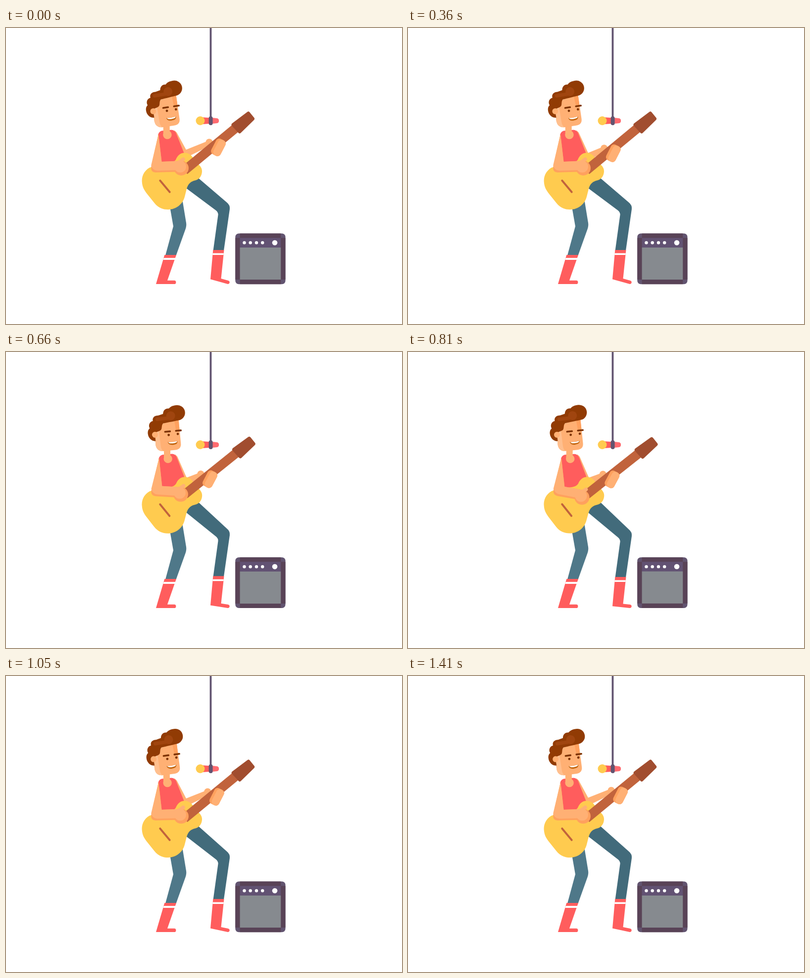
An HTML page with a canvas that plays this animation: 800 by 600 pixels, repeating every 1.44 s.

```html
<!DOCTYPE html>
<html lang="en">
<head>
<meta charset="utf-8">
<title>Guitar player</title>
<style>
  html, body { margin: 0; height: 100%; overflow: hidden; background: #fff; }
  canvas { display: block; }
</style>
</head>
<body>
<canvas id="stage" width="800" height="600"></canvas>
<script>
const ctx = document.getElementById('stage').getContext('2d');
const LOOP = 1440, BEAT = 360;
const SKIN = '#ffb074', SHADE = '#ffa15e', GLOW = '#ffbf8e', RED = '#ff5d5d', YELLOW = '#ffcb4f',
  WOOD = '#c1633c', DARK_WOOD = '#a14d2f', HAIR = '#913b04', PURPLE = '#625470', FRAME = '#594357',
  JEANS = '#426b7b', LIGHT_JEANS = '#4f7889';

const lerp = (a, b, k) => a + (b - a) * k;
const ease = (from, to, t) => {
  const x = Math.min(1, Math.max(0, (t - from) / (to - from)));
  return x * x * (3 - 2 * x);
};
// Rises from 0 to 1, holds, then falls back.
const swing = (t, a, b, c, d) => ease(a, b, t) - ease(c, d, t);

function shape(color, d) {
  ctx.fillStyle = color;
  ctx.fill(new Path2D(d));
}
function line(color, width, d) {
  ctx.strokeStyle = color;
  ctx.lineWidth = width;
  ctx.lineCap = ctx.lineJoin = 'round';
  ctx.stroke(new Path2D(d));
}
function oval(color, x, y, rx, ry = rx) {
  ctx.fillStyle = color;
  ctx.beginPath();
  ctx.ellipse(x, y, rx, ry, 0, 0, 7);
  ctx.fill();
}
function box(color, x, y, w, h, r = 0) {
  ctx.fillStyle = color;
  ctx.beginPath();
  ctx.roundRect(x, y, w, h, r);
  ctx.fill();
}
function turned(degrees, x, y, draw) {
  ctx.save();
  ctx.translate(x, y);
  ctx.rotate(degrees * Math.PI / 180);
  ctx.translate(-x, -y);
  draw();
  ctx.restore();
}

function microphone() {
  shape(RED, 'M396 181L426 183Q430 184 430 188Q430 192 426 193L396 195Z');
  shape('#ff6b70', 'M414 182.2L426 183Q430 184 430 188Q430 192 426 193L414 193.8Z');
  oval(YELLOW, 392.5, 188, 9);
  box(PURPLE, 411.6, 0, 3.8, 185);
  box(PURPLE, 409.6, 179, 8, 18, 4);
}

function amplifier(lift) {
  ctx.save();
  ctx.translate(0, -lift);
  box(PURPLE, 463.3, 416.4, 101.2, 102.8, 7);
  box(FRAME, 472.6, 416.4, 82.6, 102.8);
  box(FRAME, 463.3, 425.4, 101.2, 84.6);
  box('#625273', 472.6, 425.4, 82.6, 20);
  box('#868a8f', 472.6, 445, 82.6, 65);
  for (const x of [481.5, 493.7, 506, 518.2]) oval('#fff', x, 435.3, 3.2);
  oval('#fff', 543, 435.2, 5.3);
  ctx.restore();
}

function backLeg() {
  shape(LIGHT_JEANS, 'M328 345L338 402L322 461H343.6L362.5 408Q365 401 364 395L355 340Z');
  shape(RED, 'M320.3 460H344L326 511.8H340Q343.4 512 343.4 515.4Q343.4 519 340 519H303Z');
  shape('#fff', 'M318.8 466H342.4L341 470H317.6Z');
}

function frontLeg(drop) {
  const y = v => v + drop;
  shape(JEANS, `M386 302L446 ${y(353.5)}Q453 ${y(359)} 452 ${y(367)}L440 ${y(451)}H418.6` +
    `L428.5 ${y(379)}Q429 ${y(374)} 424.5 ${y(370)}L355 318Z`);
  shape(RED, `M418.3 ${y(450)}H440.5L434.5 ${lerp(508, 511.6, drop / 8.4)}L449 512` +
    `Q452 513 451.7 516Q451 519 448 519L413 ${y(509.3)}Z`);
  shape('#fff', `M417.6 ${y(456.5)}H439.8L439.4 ${y(460)}H417.3Z`);
}

function frettingArm(lean, hand, slide) {
  const ex = 363 + 5 * lean, ey = 247 + 8 * slide, sx = 340 + 6 * lean;
  shape(SKIN, `M${sx} 207L${sx + 5} 212L${ex + 1} ${ey}L${ex} ${ey + 14}L${ex - 12} ${ey + 8}Z`);
  shape(SKIN, `M${ex} ${ey}L${hand.x - 4} ${hand.y - 2}L${hand.x} ${hand.y + 8}L${ex} ${ey + 16}Z`);
  oval(SKIN, hand.x, hand.y, 7);
}

function torso() {
  shape(RED, 'M307 217Q309 208 318 208L334 206.5Q341 206.5 344 214L361 257L345 278H314Z');
  box(SKIN, 317.7, 192, 13, 26);
  oval(SKIN, 326, 216.5, 8.7);
}

function head(blink) {
  shape(SKIN, 'M311 158L310 186Q311 199 324 200L349 200.5Q361 200 361 188L362 138L326 145Z');
  shape(GLOW, 'M311 158L310 186Q311 199 324 200Q320 197 320 188V158Z');
  shape(SHADE, 'M353 139L354 160H361.5L362 138Z');
  shape(HAIR, 'M311 178C303 178 297 170 297 162C297 156 299 153 302 151C299 144 304 137 310 137' +
    'C309 129 316 126 322 127L332 125C333 118 338 114 345 115.5C350 110.5 357 110.5 361 110.5' +
    'A15.5 15.5 0 0 1 365 141C357 142 340 143 330 144C325 148 328 156 322 158C317 160 313 159 311 164Z');
  oval(SKIN, 311, 165, 6);
  oval('#a0450f', 347, 130.5, 9);
  line('#a0450f', 7, 'M319 134.5H343');
  line('#7f3403', 3.6, 'M332 161.5L342 161.7M354 162L364 162.2');
  for (const x of [338.5, 357]) oval('#7f3403', x, 168.7, 2.4, blink ? .5 : 2.4);
  shape('#c1650f', 'M335 182.8Q345 184.5 354.6 182.8Q355.5 189.5 345 189.5Q335.5 189.5 335 182.8Z');
  shape('#fff', 'M336 183Q345 184.5 354 183Q354 186.5 345 186.5Q337 186.5 336 183Z');
}

function guitar() {
  shape(YELLOW, 'M290 283C278 290 273 302 275 315C276 323 279 328 284 335L300 355' +
    'C308 365 318 368 327 368C344 368 357 357 361 342L365 326C368 315 374 311 382 309' +
    'C391 307 396 299 396 290C396 280 387 276 379 265C374 256 367 253 361 253' +
    'C352 253 346 259 343 267C338 275 328 274 312 277Z');
  line(WOOD, 4, 'M311.3 309.3L330.7 332.5');
  shape(WOOD, 'M353.5 282.3L458 195.5L470 210L366.4 296Z');
  shape(DARK_WOOD, 'M459 196L489.5 173L498.5 184L472 210Z');
  line(DARK_WOOD, 7, 'M459 196L489.5 173L498.5 184L472 210Z');
}

function fingers(x, y) {
  turned(27, x, y, () => {
    box(SHADE, x - 10.5, y - 17.5, 21, 35, 7);
    box(SKIN, x - 5.5, y - 17.5, 16, 35, 7);
  });
}

function strummingArm(lean, strum) {
  const at = (a, b) => lerp(a, b, strum);
  const sx = 308 + 6 * lean, sy = 215 - lean;
  const arm = rise => `M${sx} ${sy}L${at(293.2, 294.3)} ${at(282, 279) - rise}` +
    `Q${at(292.5, 293.5) + rise} ${at(292.5, 287) - rise} ${at(302, 301) + rise} ${at(292.7, 291) - rise}` +
    `L${at(344, 340)} ${at(291.5, 306) - rise}L${at(348, 356)} ${at(269.5, 289)}` +
    `L${at(314.5, 318)} ${at(271, 275)}Z`;
  const hx = at(354, 349), hy = at(284, 305);
  shape(SHADE, arm(0));
  oval(SHADE, hx, hy, 15);
  shape(SKIN, arm(3.5));
  oval(SKIN, hx - 2, hy - 3, 12);
  line(SKIN, 7.5, `M${at(347, 350)} ${at(274, 297)}L${at(358, 361)} ${at(266, 290.5)}`);
}

function draw(time) {
  const t = time % LOOP, beat = t % BEAT;
  const lean = swing(beat, 40, 180, 195, 345);
  const nod = swing(beat, 40, 200, 200, 360);
  const strum = swing(beat, 30, 150, 210, 340);
  const tap = Math.sin(Math.PI * beat / BEAT);
  const slide = swing(t, 124, 454, 812, 1142);

  // Fretting hand: a point on the neck, carried along as the guitar tilts.
  const tilt = 4 * lean, a = tilt * Math.PI / 180;
  const gx = 429 - 17.7 * slide, gy = 242 + 14.8 * slide;
  const dx = gx - 345, dy = gy - 305;
  const hand = {
    x: 345 + dx * Math.cos(a) - dy * Math.sin(a) - 18.5,
    y: 305 + dx * Math.sin(a) + dy * Math.cos(a) - 10.5
  };

  ctx.fillStyle = '#fff';
  ctx.fillRect(0, 0, 800, 600);
  microphone();
  amplifier(.5 * lean);
  frontLeg(8.4 * tap);
  backLeg();
  frettingArm(lean, hand, slide);
  turned(3 * lean, 325, 330, torso);
  ctx.save();
  ctx.translate(-6 * (1 - lean), 1.7 * (1 - lean));
  turned(-9.5 * (1 - nod), 320, 212, () => head(t > 150 && t < 300));
  ctx.restore();
  turned(tilt, 345, 305, () => {
    guitar();
    fingers(gx, gy);
  });
  strummingArm(lean, strum);
}

function frame() {
  draw(performance.now());
  requestAnimationFrame(frame);
}
frame();
</script>
</body>
</html>
```
